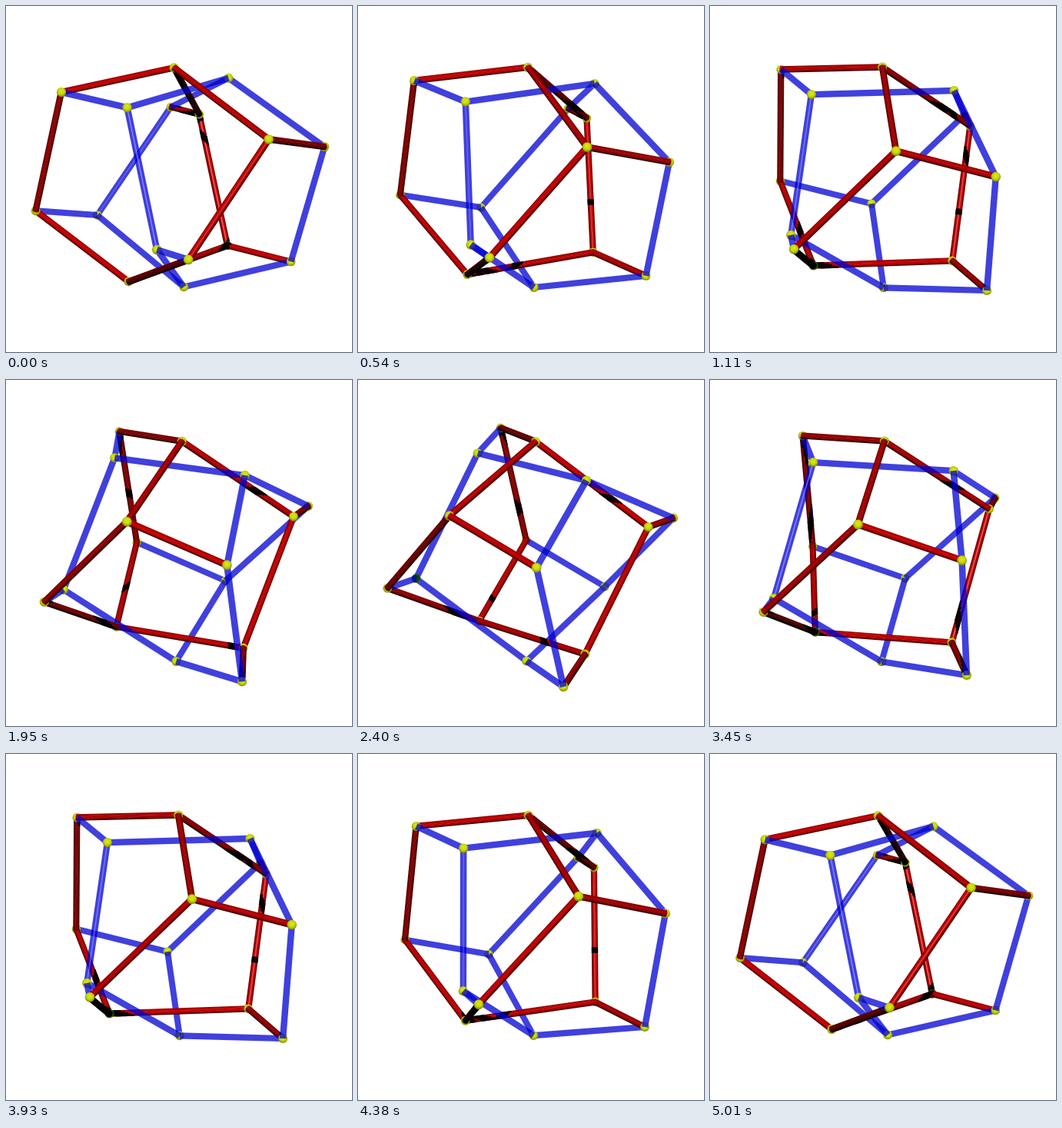
An HTML page with a canvas that plays this animation: 450 px wide and 450 px high, repeating every 5040 ms.

```html
<!DOCTYPE html>
<html lang="en">
<head>
<meta charset="utf-8">
<title>Rocking wire polyhedron</title>
<style>
html, body { margin: 0; width: 100%; height: 100%; overflow: hidden; background: #fff; }
canvas { display: block; }
</style>
</head>
<body>
<canvas id="stage" width="450" height="450"></canvas>
<script>
const ctx = document.getElementById('stage').getContext('2d');

// Half of the corners; the other half are their mirror images through the centre.
const half = [
  [-126.5, -84.5, 127], [0, -9, 148.7], [1.3, 156, 90.2], [127.5, 138, 46.6],
  [-92, 0, 117.5], [-125, 86.2, -41.1], [-124.3, 140.5, -39.5], [-91.8, 0, -117.5]
];
const corners = [...half, ...half.map(p => p.map(c => -c))];

// Every red bar has a blue counterpart on the opposite side.
const redBars = [[0, 1], [0, 11], [11, 7], [7, 6], [7, 12], [2, 6],
  [12, 8], [12, 13], [13, 1], [13, 14], [1, 2], [2, 3]];

const TILT_SIN = 0.329, TILT_COS = 0.944, DISTANCE = 2850;
const LIGHT_Y = 0.28, LIGHT_LEN = Math.hypot(LIGHT_Y, 1);
const BAR_R = 4, BALL_R = 6;
const STEP = 30, STEPS = 168;

const mix = (p, q, t) => p.map((c, i) => c + (q[i] - c) * t);
const clamp = t => Math.max(0, Math.min(1, t));

function turn([u, v, w], angle) {
  const c = Math.cos(angle), s = Math.sin(angle);
  const depth = v * c - u * s;
  return [u * c + v * s, w * TILT_COS - depth * TILT_SIN, depth * TILT_COS + w * TILT_SIN];
}

const scaleAt = z => 1 / (1 - z / DISTANCE);
const project = ([x, y, z]) => [225 + x * scaleAt(z), 225 - y * scaleAt(z)];
const lightPlane = ([x, y, z]) => [x, (y - LIGHT_Y * z) / LIGHT_LEN];

// Position along segment a-b nearest to p, and the distance there.
function nearest(p, a, b) {
  const dx = b[0] - a[0], dy = b[1] - a[1];
  const t = clamp(((p[0] - a[0]) * dx + (p[1] - a[1]) * dy) / (dx * dx + dy * dy || 1));
  return { t, d: Math.hypot(a[0] + dx * t - p[0], a[1] + dy * t - p[1]) };
}

const zAt = (item, t) => item.p[2] + (item.q[2] - item.p[2]) * t;
const touches = (m, n) => m.i === n.i || m.i === n.j || m.j === n.i || m.j === n.j;

function makeItem(points, i, j, kind) {
  const p = points[i], q = points[j];
  return { i, j, p, q, kind, ball: i === j, a: project(p), b: project(q),
    la: lightPlane(p), lb: lightPlane(q) };
}

function crossing(m, n) {
  const rx = m.b[0] - m.a[0], ry = m.b[1] - m.a[1];
  const sx = n.b[0] - n.a[0], sy = n.b[1] - n.a[1];
  const det = rx * sy - ry * sx;
  if (Math.abs(det) < 1e-6) return null;
  const ox = n.a[0] - m.a[0], oy = n.a[1] - m.a[1];
  const t = (ox * sy - oy * sx) / det, u = (ox * ry - oy * rx) / det;
  return t >= 0 && t <= 1 && u >= 0 && u <= 1 ? { t, u } : null;
}

// Positive when m lies in front of n where the two overlap, 0 when they do not.
function inFront(m, n) {
  if (m.ball && n.ball) {
    return Math.hypot(m.a[0] - n.a[0], m.a[1] - n.a[1]) < 2 * BALL_R ? m.p[2] - n.p[2] : 0;
  }
  if (m.ball) return -inFront(n, m);
  if (n.ball) {
    if (touches(m, n)) {
      const rise = (m.i === n.i ? 1 : -1) * (m.q[2] - m.p[2]);
      return rise / Math.hypot(m.b[0] - m.a[0], m.b[1] - m.a[1]) - 0.35;
    }
    const { t, d } = nearest(n.a, m.a, m.b);
    return d < BAR_R + BALL_R ? zAt(m, t) - n.p[2] : 0;
  }
  if (touches(m, n)) return 0;
  const hit = crossing(m, n);
  return hit ? zAt(m, hit.t) - zAt(n, hit.u) : 0;
}

function backToFront(items) {
  const order = [], seen = new Set();
  const visit = m => {
    if (seen.has(m)) return;
    seen.add(m);
    for (const n of items) if (n !== m && inFront(m, n) > 0) visit(n);
    order.push(m);
  };
  [...items].sort((m, n) => m.p[2] + m.q[2] - n.p[2] - n.q[2]).forEach(visit);
  return order;
}

function shadowed(point, owner, items) {
  const at = lightPlane(point);
  return items.some(m => {
    if (m === owner || ((m.ball || owner.ball) && touches(m, owner))) return false;
    const { t, d } = nearest(at, m.la, m.lb);
    return d < (m.ball ? BALL_R : BAR_R) && zAt(m, t) > point[2] + BAR_R;
  });
}

function line(a, b, width, color) {
  ctx.lineWidth = width;
  ctx.strokeStyle = color;
  ctx.beginPath();
  ctx.moveTo(...a);
  ctx.lineTo(...b);
  ctx.stroke();
}

function glint(m, axis, color) {
  const slant = (axis[1] * LIGHT_Y / 2 + axis[2]) / 0.075;
  ctx.globalAlpha = 0.55 * Math.max(0, 1 - slant * slant);
  line(m.a, m.b, 1.4, color);
  ctx.globalAlpha = 1;
}

function drawRed(m, axis, items, length) {
  const [x, y, z] = axis, flat = Math.hypot(x, y) || 1e-6;
  const side = [-y / flat, x / flat, 0];
  const front = [-x * z / flat, -y * z / flat, flat];
  const strips = [-0.8, -0.4, 0.4, 0.8, 0].map(s => {
    const normal = side.map((c, k) => c * s + front[k] * Math.sqrt(1 - s * s));
    const on = t => mix(m.p, m.q, t).map((c, k) => c + normal[k] * BAR_R);
    return { normal, on };
  });
  const width = 2 * scaleAt(zAt(m, 0.5));
  for (const { normal, on } of strips) {
    const lit = Math.max(0, (normal[1] * LIGHT_Y + normal[2]) / LIGHT_LEN);
    line(project(on(0)), project(on(1)), width, `rgb(${Math.round(205 * lit)},0,0)`);
  }
  glint(m, axis, '#fbb');
  const count = Math.ceil(length / 2);
  for (const { on } of strips) {
    for (let k = 0; k < count; k++) {
      if (shadowed(on((k + 0.5) / count), m, items)) {
        line(project(on(k / count)), project(on((k + 1) / count)), width + 0.2, '#000');
      }
    }
  }
}

function drawBar(m, items) {
  const d = m.q.map((c, k) => c - m.p[k]), length = Math.hypot(...d);
  const axis = d.map(c => c / length);
  if (m.kind === 'red') return drawRed(m, axis, items, length);
  line(m.a, m.b, 8.2 * scaleAt(zAt(m, 0.5)), 'rgba(0,0,210,0.75)');
  glint(m, axis, '#ccf');
}

function drawBall(m, items) {
  const [x, y] = m.a, r = BALL_R * scaleAt(m.p[2]);
  const top = [m.p[0], m.p[1] + BALL_R * LIGHT_Y, m.p[2] + BALL_R];
  const paint = ctx.createRadialGradient(x, y - 1.5, 0, x, y - 1, r + 1);
  const shades = shadowed(top, m, items)
    ? ['#063006', '#0a4a0a', '#406000'] : ['#d8e82c', '#c8d800', '#7c8600'];
  shades.forEach((c, k) => paint.addColorStop([0, 0.55, 1][k], c));
  ctx.fillStyle = paint;
  ctx.beginPath();
  ctx.arc(x, y, r, 0, 2 * Math.PI);
  ctx.fill();
}

function draw(step) {
  const angle = (45 - 90 * Math.min(step, STEPS - step) / (STEPS / 2)) * Math.PI / 180;
  const points = corners.map(p => turn(p, angle));
  const items = [
    ...points.map((_, i) => makeItem(points, i, i, 'ball')),
    ...redBars.map(([i, j]) => makeItem(points, i, j, 'red')),
    ...redBars.map(([i, j]) => makeItem(points, i ^ 8, j ^ 8, 'blue'))
  ];
  ctx.fillStyle = '#fff';
  ctx.fillRect(0, 0, 450, 450);
  for (const m of backToFront(items)) (m.ball ? drawBall : drawBar)(m, items);
}

const start = performance.now();
let shown = -1;
function tick() {
  const step = Math.floor((performance.now() - start) / STEP) % STEPS;
  if (step !== shown) draw(shown = step);
  requestAnimationFrame(tick);
}
tick();
</script>
</body>
</html>
```
